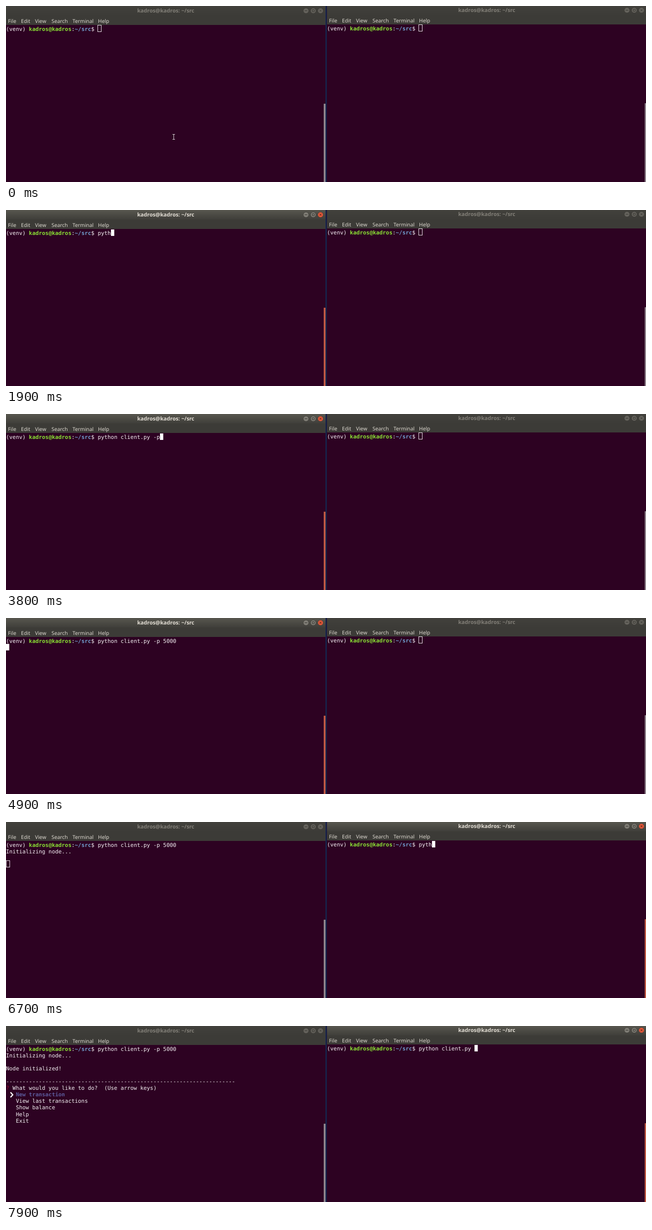
Recreate the animation shown at these times as an HTML page with a canvas. Size 1280 by 353 pixels, loop 8 s.

```html
<!DOCTYPE html>
<html lang="en">
<head>
<meta charset="utf-8">
<title>Two terminals</title>
<style>
html, body { margin: 0; width: 100%; height: 100%; overflow: hidden; background: #2d0222; }
canvas { display: block; }
</style>
</head>
<body>
<canvas id="stage" width="1280" height="353"></canvas>
<script>
const ctx = document.getElementById('stage').getContext('2d');
const LOOP = 8000, COL = 6.55, ROW = 13.1;
const MONO = '"DejaVu Sans Mono", monospace';
const SANS = '"Noto Sans", "Open Sans", sans-serif';
const USER = 'kadros@kadros';
const WHITE = '#f6f3f5';
const MENU = [['File', 4], ['Edit', 30], ['View', 58], ['Search', 91], ['Terminal', 133], ['Help', 184]];

// Each step: [time, text on the command line]
const KEYS_LEFT = [
  [1400, 'p'], [1600, 'py'], [1700, 'pyt'], [1900, 'pyth'],
  [2300, 'pytho'], [2400, 'python'], [2500, 'python '], [2600, 'python c'],
  [2700, 'python cl'], [2800, 'python client.py '],
  [3300, 'python client.py -'], [3700, 'python client.py -p'],
  [4200, 'python client.py -p '], [4400, 'python client.py -p 5'],
  [4500, 'python client.py -p 50'], [4600, 'python client.py -p 500'],
  [4700, 'python client.py -p 5000']
];
const KEYS_RIGHT = [
  [6300, 'p'], [6400, 'py'], [6600, 'pyt'], [6700, 'pyth'],
  [6900, 'pytho'], [7000, 'python'], [7200, 'python '], [7300, 'python c'],
  [7400, 'python cl'], [7600, 'python client.py ']
];
const FOCUS_LEFT = 100, ENTER = 4900, INIT = 5100, FOCUS_RIGHT = 5600, READY = 7300;

const typed = (keys, t) => keys.reduce((s, [at, text]) => t >= at ? text : s, '');

function rect(x, y, w, h, fill) {
  ctx.fillStyle = fill;
  ctx.fillRect(x, y, w, h);
}

function label(s, x, y, font, fill, align = 'left') {
  ctx.font = font;
  ctx.fillStyle = fill;
  ctx.textAlign = align;
  ctx.fillText(s, x, y);
}

function button(x, y, kind, active) {
  const close = kind === 'close';
  ctx.beginPath();
  ctx.arc(x, y, 5.4, 0, 7);
  ctx.fillStyle = active ? (close ? '#e2593b' : '#7e7c74') : '#64625c';
  ctx.fill();
  ctx.lineWidth = 0.7;
  ctx.strokeStyle = '#3a3934';
  ctx.stroke();
  ctx.lineWidth = 1;
  ctx.strokeStyle = active && close ? '#4f1c10' : '#383732';
  ctx.beginPath();
  if (kind === 'min') {
    ctx.moveTo(x - 2.5, y);
    ctx.lineTo(x + 2.5, y);
  } else if (kind === 'max') {
    ctx.rect(x - 2, y - 2, 4, 4);
  } else {
    ctx.moveTo(x - 2, y - 2);
    ctx.lineTo(x + 2, y + 2);
    ctx.moveTo(x + 2, y - 2);
    ctx.lineTo(x - 2, y + 2);
  }
  ctx.stroke();
}

function term(win, row, col, s, fill = WHITE, bold = false) {
  label(s, win.x + col * COL, win.top + row * ROW + 10.7, `${bold ? 'bold ' : ''}10.88px ${MONO}`, fill);
}

function caret(win, row, col, active) {
  const x = win.x + col * COL, y = Math.round(win.top + row * ROW);
  if (active) {
    rect(Math.ceil(x), y, 6.5, 13, '#ffffff');
  } else {
    ctx.strokeStyle = '#e9e3e7';
    ctx.lineWidth = 1;
    ctx.strokeRect(Math.floor(x) + 0.5, y - 0.5, 7, 13);
  }
}

function chevron(x, y) {
  ctx.strokeStyle = '#ffffff';
  ctx.lineWidth = 2.4;
  ctx.beginPath();
  ctx.moveTo(x, y - 5);
  ctx.lineTo(x + 4.5, y);
  ctx.lineTo(x, y + 5);
  ctx.stroke();
}

function frame(win, active) {
  const { x, dy, w } = win;
  const bar = ctx.createLinearGradient(0, 0, 0, 20);
  bar.addColorStop(0, active ? '#58574f' : '#42413c');
  bar.addColorStop(1, active ? '#3e3d39' : '#3c3b37');
  rect(x, 0, w, 20, bar);
  rect(x, 19, w, 19 + dy, '#3c3b37');
  label(USER + ': ~/src', x + 319.5, 13.2 + dy, `bold 10.7px ${SANS}`, active ? '#e4dfd6' : '#827f78', 'center');
  button(x + 600, 9.5 + dy, 'min', active);
  button(x + 614.5, 9.5 + dy, 'max', active);
  button(x + 629, 9.5 + dy, 'close', active);
  for (const [s, mx] of MENU) label(s, x + mx, 33.6 + dy, `10.3px ${SANS}`, '#dcd8cf');
  rect(x + 635.5, 196 + dy, 3.5, 160, active ? '#c55c44' : '#938990');
}

function prompt(win, command) {
  term(win, 0, 0, '(venv)');
  term(win, 0, 7, USER, '#8ae234', true);
  term(win, 0, 20, ':');
  term(win, 0, 21, '~/src', '#729fcf', true);
  term(win, 0, 26, '$');
  if (command) term(win, 0, 28, command);
}

function menu(win) {
  term(win, 3, 0, 'Node initialized!');
  term(win, 5, 0, '-'.repeat(70));
  term(win, 6, 0, '?', '#9c0830');
  term(win, 6, 2, 'What would you like to do?  (Use arrow keys)');
  chevron(9, 138);
  term(win, 7, 3, 'New transaction', '#5c5b9c', true);
  ['View last transactions', 'Show balance', 'Help', 'Exit'].forEach((s, i) => term(win, 8 + i, 3, s));
}

function pointer(x, y) {
  const ink = '#d8d2d6';
  rect(x, y - 5, 1, 10, ink);
  rect(x - 2, y - 5, 5, 1, ink);
  rect(x - 2, y + 5, 5, 1, ink);
}

const left = { x: 0, dy: 0, w: 639, top: 38.8 };
const right = { x: 642, dy: -1, w: 638, top: 38 };

function draw(t) {
  const leftOn = t >= FOCUS_LEFT && t < FOCUS_RIGHT, rightOn = t >= FOCUS_RIGHT;
  rect(0, 0, 1280, 353, '#2d0222');
  frame(left, leftOn);
  frame(right, rightOn);
  rect(639, 0, 2.5, 353, '#15264f');

  const a = typed(KEYS_LEFT, t), b = typed(KEYS_RIGHT, t);
  prompt(left, a);
  prompt(right, b);
  if (t >= INIT) term(left, 1, 0, 'Initializing node...');
  if (t >= READY) menu(left);
  else if (t >= INIT) caret(left, 3, 0, leftOn);
  else if (t >= ENTER) caret(left, 1, 0, leftOn);
  else caret(left, 0, 28 + a.length, leftOn);
  caret(right, 0, 28 + b.length, rightOn);

  // The pointer hides while typing
  if (t < KEYS_LEFT[0][0]) {
    pointer(335, 262);
  } else if (t >= 5200 && t < KEYS_RIGHT[0][0]) {
    const p = Math.min(1, (t - 5200) / 350), e = p * p * (3 - 2 * p);
    pointer(335 + 523 * e, 262 - 107 * e);
  }
}

const start = performance.now();
function tick() {
  ctx.textRendering = 'geometricPrecision';
  draw((performance.now() - start) % LOOP);
  requestAnimationFrame(tick);
}
tick();
</script>
</body>
</html>
```
